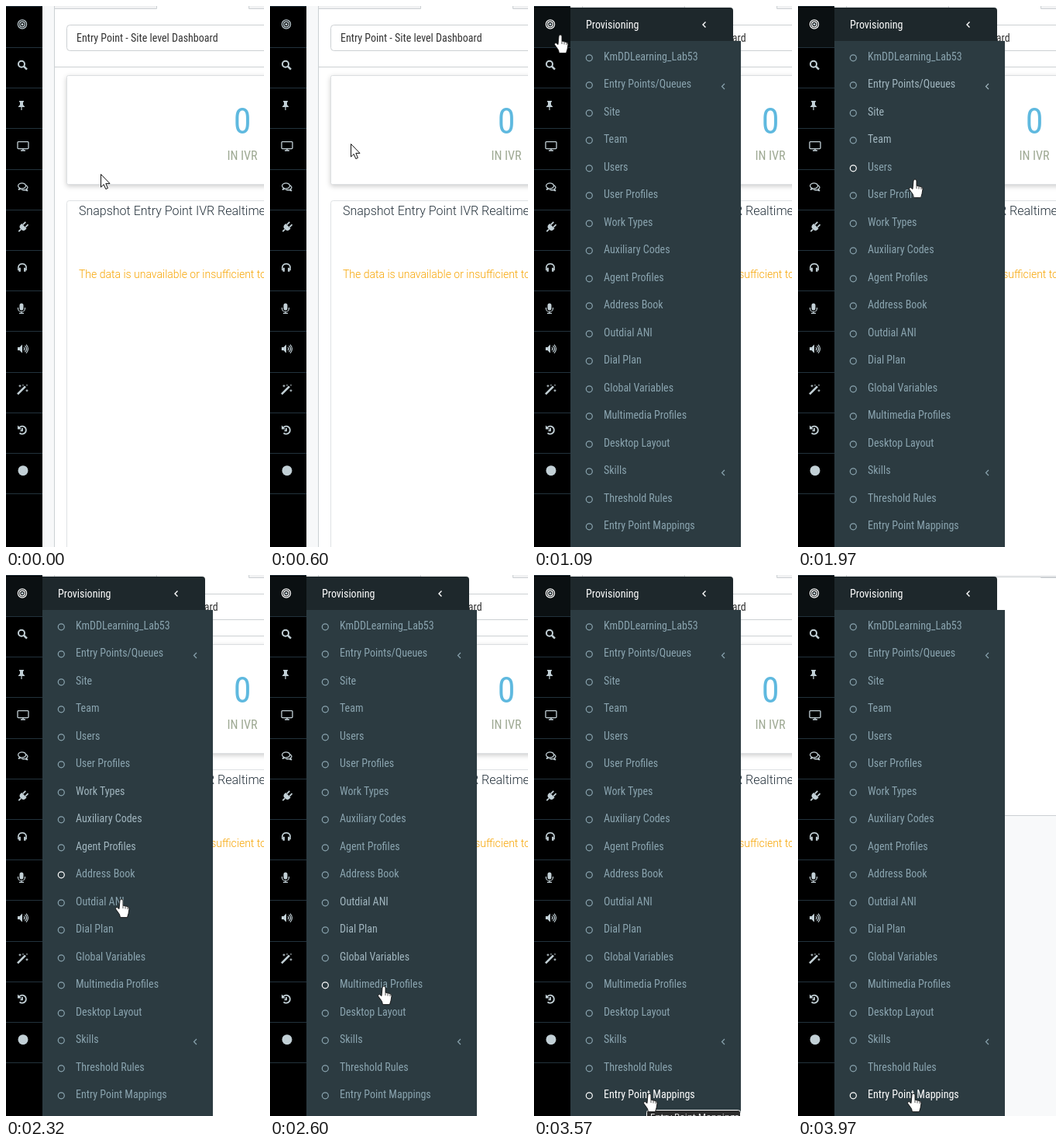
An HTML page that plays this animation: 333x696 px, repeating every 4.43 s.

```html
<!DOCTYPE html>
<html lang="en">
<head>
<meta charset="utf-8">
<title>Provisioning menu</title>
<style>
  html, body { margin: 0; width: 100%; height: 100%; overflow: hidden; background: #fff; }
  svg { display: block; width: 100%; height: 100%; }
  text { font: 14px Roboto, sans-serif; }
  .narrow { font-family: "Roboto Condensed", Roboto, sans-serif; font-stretch: 75%; }
  .tight .narrow { letter-spacing: -.054em; }
  .light { font-weight: 300; }
  .card { fill: #fff; stroke: #dcdfe1; filter: drop-shadow(0 2px 3px #0003); }
  .line { fill: none; stroke: #ccd0d3; }
  .glyph { fill: none; stroke: #c2d0d6; stroke-width: 1.5; }
  .glyph .solid { fill: #c2d0d6; stroke: none; }
  .tip { font: 11.5px "Open Sans", sans-serif; fill: #fff; }
</style>
</head>
<body>
<svg viewBox="0 0 333 696">
  <rect width="333" height="696" fill="#fff"/>
  <rect x="47" width="15" height="696" fill="#f7f8f9"/>
  <path d="M63 0h131v3H63zM314 0h19v3h-19z" fill="#f1f2f3"/>
  <path class="line" d="M62.5 0V696M62 3.5H194.5V0M313.5 0V3.5H333"/>

  <g id="dashboard">
    <path class="line" d="M62 78.5H333"/>
    <rect class="line" x="78.5" y="24.5" width="280" height="33" rx="4"/>
    <text class="narrow" x="91" y="46" fill="#333">Entry Point - Site level Dashboard</text>
    <rect class="card" x="78.5" y="89.5" width="300" height="140" rx="2"/>
    <text class="narrow" x="305" y="164" text-anchor="middle" style="font-size:46px" fill="#5fb9df">0</text>
    <text class="narrow" x="305" y="198" text-anchor="middle" style="font-size:16px" fill="#9da892">IN IVR</text>
    <rect class="line" x="78.5" y="250.5" width="300" height="500" rx="3" style="stroke:#dfe2e4"/>
    <text class="light" x="94" y="269" style="font-size:16px" fill="#25323c">Snapshot Entry Point IVR Realtime</text>
    <text class="light" x="94" y="350" fill="#f7a400">The data is unavailable or insufficient to</text>
  </g>
  <g id="nextPage">
    <path d="M63 0H333V2H63z" fill="#f1f2f3"/>
    <path d="M63 310H333V696H63z" fill="#f8f9fa"/>
    <path class="line" d="M62 2.5H333M62 309.5H333"/>
  </g>

  <rect width="47" height="696"/>
  <rect id="active" y="2" width="47" height="51" fill="#0b1012"/>
  <g id="sidebar"></g>

  <g id="menu">
    <path d="M47 2H253q4 0 4 4V45H47z" fill="#1e282c"/>
    <path d="M47 45H267V696H47z" fill="#2c3b41"/>
    <text id="heading" class="narrow" x="67" y="29" fill="#fff">Provisioning</text>
    <path d="M221.500 20.500l-3.500 3.500 3.500 3.500" fill="none" stroke="#fff" stroke-width="1.400"/>
    <g id="items"></g>
  </g>

  <g id="tooltip">
    <rect x="145.500" y="688.500" width="121" height="24" rx="3" fill="#2b2b2b" stroke="#fff"/>
    <text class="tip" x="150" y="701">Entry Point Mappings</text>
  </g>

  <path id="arrow" d="M.5.5v16.500l3.700-3.500 2.600 6 2.600-1.100-2.600-6h5.200z" fill="#fff" stroke="#111"/>
  <g id="hand">
    <path d="M-2 2a2 2 0 0 1 4 0v6l6 1.600q2 .7 2 3l-1 6-1.500 5h-9l-1-4-5-7q0-2.500 2-2l2.500 2z" fill="#fff" stroke="#111" stroke-width=".9"/>
    <path d="M2 8v4M5 9v3.500M8 10v3" stroke="#222" stroke-width=".8"/>
  </g>
</svg>
<script>
const LOOP = 4430, STEP = 70, ROW = 35.47, FIRST = 65;
const $ = id => document.getElementById(id);
const show = (id, on) => $(id).style.display = on ? '' : 'none';

// Sidebar glyphs, drawn around their own centre
const glyphs = [
  '<circle r="5.600" stroke-width="1.200"/><circle r="3.300" stroke-width="1.200"/><circle r="1.500" class="solid"/>',
  '<circle cx="-1" cy="-1" r="4" stroke-width="2"/><path d="M2 2L6 6" stroke-width="2.400"/>',
  '<path class="solid" d="M-4-6h6v1.500h-1v3.500l2.500 3h-9l2.500-3v-3.500h-1z"/><path d="M-1 1V6" stroke-width="1.200"/>',
  '<rect x="-6" y="-5.500" width="14" height="9" rx="1" stroke-width="1.300"/><path d="M1 3V6M-2 6H4"/>',
  '<path d="M-3 2l-2 2 4-1.500a5 3.500 0 1 0-2-.5z" stroke-width="1.300"/><path d="M5-1.500q4 3 0 5l2 2-4-1.200q-3 .5-4-.7" stroke-width="1.300"/>',
  '<g transform="translate(1 0) rotate(45)"><path class="solid" d="M-4.500-2h9v2q0 4-4.500 4t-4.500-4z"/><path d="M-2.300-7V-2M2.300-7V-2M0 4V8" stroke-width="1.800"/></g>',
  '<path d="M-5 3.500Q-6.500-5 0-5T5 3.500" stroke-width="1.700"/><path d="M-3.300 0V5M3.300 0V5" stroke-width="2.400"/>',
  '<rect class="solid" x="-3.500" y="-6.500" width="5" height="9" rx="2.500"/><path d="M-5.500-1v1a4.500 4.500 0 0 0 9 0v-1M-1 4.500V6.500M-4 6.500H2" stroke-width="1.200"/>',
  '<path class="solid" d="M-6-2h2.500l3.500-3.500v11l-3.500-3.500H-6z"/><path d="M2-2q2 2 0 4M3.500-4q4 4 0 8M5-5.500q5 5.500 0 11" stroke-width="1.200"/>',
  '<path d="M-6 6L4-4" stroke-width="2.600"/><path d="M-3-6v3M-4.500-4.500h3M1-6.500v2M6-6.500v2M6 0v3M4.500 1.500h3" stroke-width="1"/>',
  '<path d="M-4-3A5 5 0 1 1-3.500 3.800M0-2.500V.8H-2.500" stroke-width="1.800"/><path class="solid" d="M-6-6V-1H-1z"/>',
  '<circle cx="1" r="6.500" class="solid"/>'
];
$('sidebar').innerHTML = '<path d="M0 .5H47" stroke="#22323c"/>' + glyphs.map((shape, i) => {
  const y = 52.2 * i;
  return `<path d="M0 ${Math.round(y + 53) + .5}H47" stroke="#22323c"/>
    <g class="glyph" transform="translate(21 ${(y + 23.5).toFixed(1)})">${shape}</g>`;
}).join('');

const labels = ['KmDDLearning_Lab53', 'Entry Points/Queues', 'Site', 'Team', 'Users', 'User Profiles',
  'Work Types', 'Auxiliary Codes', 'Agent Profiles', 'Address Book', 'Outdial ANI', 'Dial Plan',
  'Global Variables', 'Multimedia Profiles', 'Desktop Layout', 'Skills', 'Threshold Rules',
  'Entry Point Mappings'];
$('items').innerHTML = labels.map((label, i) => {
  const chevron = /Queues|Skills/.test(label)
    ? '<path d="M246 35l-3.500 3.500 3.500 3.500" transform="translate(0 -35)" fill="none" stroke-width="1.200"/>' : '';
  return `<g transform="translate(0 ${Math.round(FIRST + ROW * i)})">
    <circle cx="71.300" cy="1.800" r="4" fill="none" stroke-width="1.200"/>
    <text class="narrow" x="90" y="5">${label}</text>${chevron}</g>`;
}).join('');
const rows = [...$('items').children];

// Without a condensed face, tighten the tracking instead
if ($('heading').getComputedTextLength() > 73) document.querySelector('svg').classList.add('tight');

// Pointer path: time, x, y
const arrowPath = [[460, 122, 216], [1020, 50, 59]];
const handPath = [[1550, 34, 37], [1970, 151, 223], [2120, 150, 321], [2460, 148, 484],
  [2530, 147, 515], [2600, 147, 529], [2670, 148, 590], [3150, 149, 667]];

function along(path, t) {
  const next = path.findIndex(key => key[0] > t);
  if (next === 0) return path[0].slice(1);
  if (next < 0) return path[path.length - 1].slice(1);
  const a = path[next - 1], b = path[next], p = (t - a[0]) / (b[0] - a[0]);
  return [a[1] + (b[1] - a[1]) * p, a[2] + (b[2] - a[2]) * p];
}
const stepped = (t, start) => start + Math.floor((t - start) / STEP) * STEP;
const place = (id, [x, y]) => $(id).setAttribute('transform', `translate(${Math.round(x)} ${Math.round(y)})`);
const mix = p => `rgb(${[138, 164, 175].map(c => Math.round(c + (255 - c) * p))})`;

function draw(t) {
  const open = t >= 1090, left = t >= 3840;
  for (const id of ['menu', 'active', 'hand']) show(id, open);
  show('arrow', !open);
  show('tooltip', t >= 3570 && t < 3770);
  show('dashboard', !left);
  show('nextPage', left);
  $('sidebar').querySelector('.glyph').style.stroke = open ? '#fff' : '';

  place('arrow', along(arrowPath, stepped(t, 530)));
  const now = stepped(t, 1620);
  place('hand', along(handPath, now));

  // The bullet follows the pointer one step late; the label fades behind it
  const rowAt = lag => Math.floor((along(handPath, now - lag * STEP)[1] - FIRST + ROW / 2) / ROW);
  const trail = [2, 3, 4].map(rowAt), hovered = rowAt(1);
  rows.forEach((row, i) => {
    const [bullet, label, chevron] = row.children;
    const visits = trail.filter(r => r === i).length;
    const glow = Math.min(1, Math.max(0, visits / 2 - .3));
    bullet.setAttribute('stroke', mix(i === hovered ? 1 : 0));
    label.setAttribute('fill', mix(glow));
    if (chevron) chevron.setAttribute('stroke', mix(glow));
  });
}

const began = performance.now();
function tick() {
  draw((performance.now() - began) % LOOP);
  requestAnimationFrame(tick);
}
tick();
</script>
</body>
</html>
```
